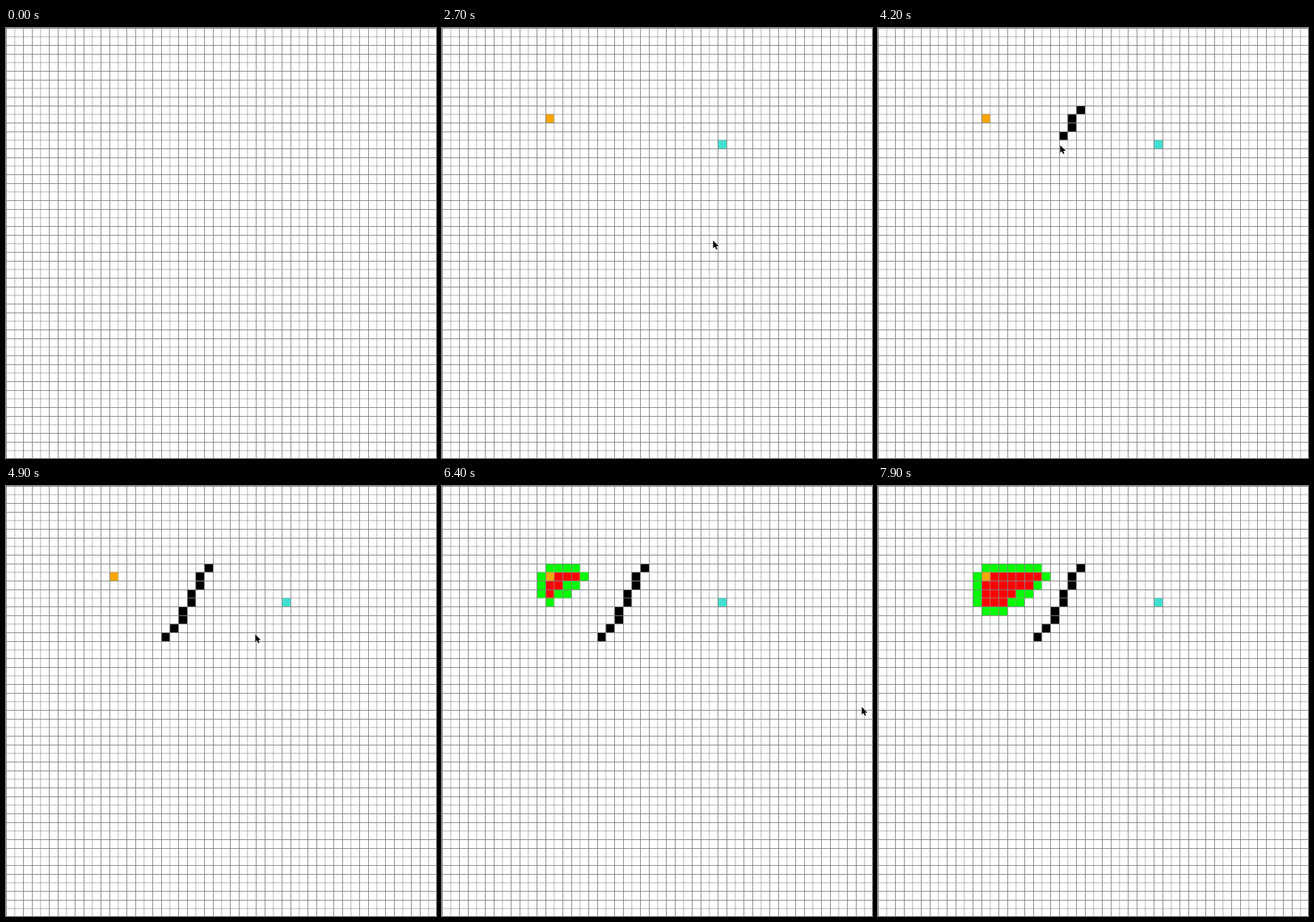
Write an HTML page that moves like this. It is 532 by 532 pixels and loops after 8 s.

```html
<!DOCTYPE html>
<html lang="en">
<head>
<meta charset="utf-8">
<title>Path search</title>
<style>
  html, body { margin: 0; width: 100%; height: 100%; overflow: hidden; background: #fff; }
  svg { display: block; width: 100%; height: 100%; }
</style>
</head>
<body>
<svg viewBox="0 0 532 532">
  <defs>
    <pattern id="grid" width="32" height="32" patternUnits="userSpaceOnUse" shape-rendering="crispEdges" fill="#808080">
      <path d="M10 0h1v32h-1z" fill-opacity=".38"/>
      <path d="M0 10h32v1h-32z" fill-opacity=".38"/>
      <path d="M11 0h1v32h-1z" fill-opacity=".18"/>
      <path d="M0 11h32v1h-32z" fill-opacity=".18"/>
      <path d="M0 0h1v32h-1zM21 0h1v32h-1z" fill-opacity=".83"/>
      <path d="M0 0h32v1h-32zM0 21h32v1h-32z" fill-opacity=".83"/>
    </pattern>
  </defs>
  <rect width="532" height="532" fill="#fff"/>
  <g id="cells"></g>
  <rect width="532" height="532" fill="url(#grid)"/>
  <g id="cursor">
    <path d="M.4 1V10.6L2.6 8.6L4.1 12L5.6 11.3L4.2 8.1H7.2Z" stroke="#fff" stroke-width=".6" paint-order="stroke"/>
  </g>
</svg>
<script>
const LOOP = 8000, STEP = 100, CELL = 32 / 3, SIZE = 50;
const START = [12, 10], END = [32, 13];
const START_AT = 1600, END_AT = 2400;
const DRAW_FROM = 3500, DRAW_TO = 4600, DRAW_TOP = 93;
const SEARCH_FROM = 5430, SEARCH_STEP = 114.5;
const COLORS = { open: '#00ff00', closed: '#ff0000', wall: '#000', start: '#ffa500', end: '#40e0d0' };

// The wall is a slanted line of nine cells.
const walls = Array.from({ length: 9 }, (_, i) => [Math.round(23 - i * .58), 9 + i]);

// Cursor stops: [time, x, y]
const stops = [
  [900, 188, 162], [1400, 131, 113], [1600, 131, 113], [1800, 265, 150], [2200, 344, 144],
  [2400, 344, 144], [2700, 335, 262], [3200, 249, 93], [DRAW_FROM, 249, 93], [4200, 225, 144],
  [DRAW_TO, 194, 190], [5000, 346, 180], [5600, 377, 214], [6000, 511, 268], [7100, 533, 280]
];

function cursorAt(t) {
  const i = stops.findIndex(s => s[0] > t);
  if (i < 1) return null;
  const [t0, x0, y0] = stops[i - 1], [t1, x1, y1] = stops[i];
  const p = (t - t0) / (t1 - t0);
  return [x0 + (x1 - x0) * p, y0 + (y1 - y0) * p];
}

// Cells appear as the cursor passes below them.
function wallCount(t) {
  if (t < DRAW_FROM) return 0;
  return Math.floor((cursorAt(Math.min(t, DRAW_TO))[1] - DRAW_TOP) / CELL);
}

// A* with a Manhattan heuristic; a node turns closed one step after it is expanded.
function search(limit) {
  const cost = (x, y) => Math.abs(x - END[0]) + Math.abs(y - END[1]);
  const seen = new Set([...walls, START].map(String));
  const queue = [{ x: START[0], y: START[1], g: 0, f: 0, id: 0 }];
  const steps = [];
  let id = 0;
  while (steps.length < limit && queue.length) {
    queue.sort((a, b) => a.f - b.f || a.id - b.id);
    const node = queue.shift(), opened = [];
    for (const [dx, dy] of [[1, 0], [-1, 0], [0, 1], [0, -1]]) {
      const x = node.x + dx, y = node.y + dy, key = x + ',' + y;
      if (seen.has(key) || Math.min(x, y) < 0 || Math.max(x, y) >= SIZE) continue;
      seen.add(key);
      const g = node.g + 1;
      queue.push({ x, y, g, f: g + cost(x, y), id: ++id });
      opened.push([x, y]);
    }
    steps.push({ node: [node.x, node.y], opened });
  }
  return steps;
}

const steps = search(Math.floor((LOOP - SEARCH_FROM) / SEARCH_STEP));
const layer = document.getElementById('cells');
const cursor = document.getElementById('cursor');

const rect = ([x, y], kind) =>
  `<rect x="${x * CELL}" y="${y * CELL}" width="${CELL}" height="${CELL}" fill="${COLORS[kind]}"/>`;

function draw(t) {
  const count = Math.max(0, Math.floor((t - SEARCH_FROM) / SEARCH_STEP));
  const done = steps.slice(0, count), cells = new Map();
  const put = (pos, kind) => cells.set(String(pos), rect(pos, kind));
  walls.slice(0, wallCount(t)).forEach(p => put(p, 'wall'));
  done.forEach(s => s.opened.forEach(p => put(p, 'open')));
  done.slice(0, -1).forEach(s => put(s.node, 'closed'));
  if (t >= START_AT) put(START, 'start');
  if (t >= END_AT) put(END, 'end');
  layer.innerHTML = [...cells.values()].join('');

  const pos = cursorAt(t);
  cursor.setAttribute('visibility', pos ? 'visible' : 'hidden');
  if (pos) cursor.setAttribute('transform', `translate(${pos})`);
}

let last = -1;
const origin = performance.now();
function tick() {
  const t = Math.floor(((performance.now() - origin) % LOOP) / STEP) * STEP;
  if (t !== last) draw(last = t);
  requestAnimationFrame(tick);
}
tick();
</script>
</body>
</html>
```
